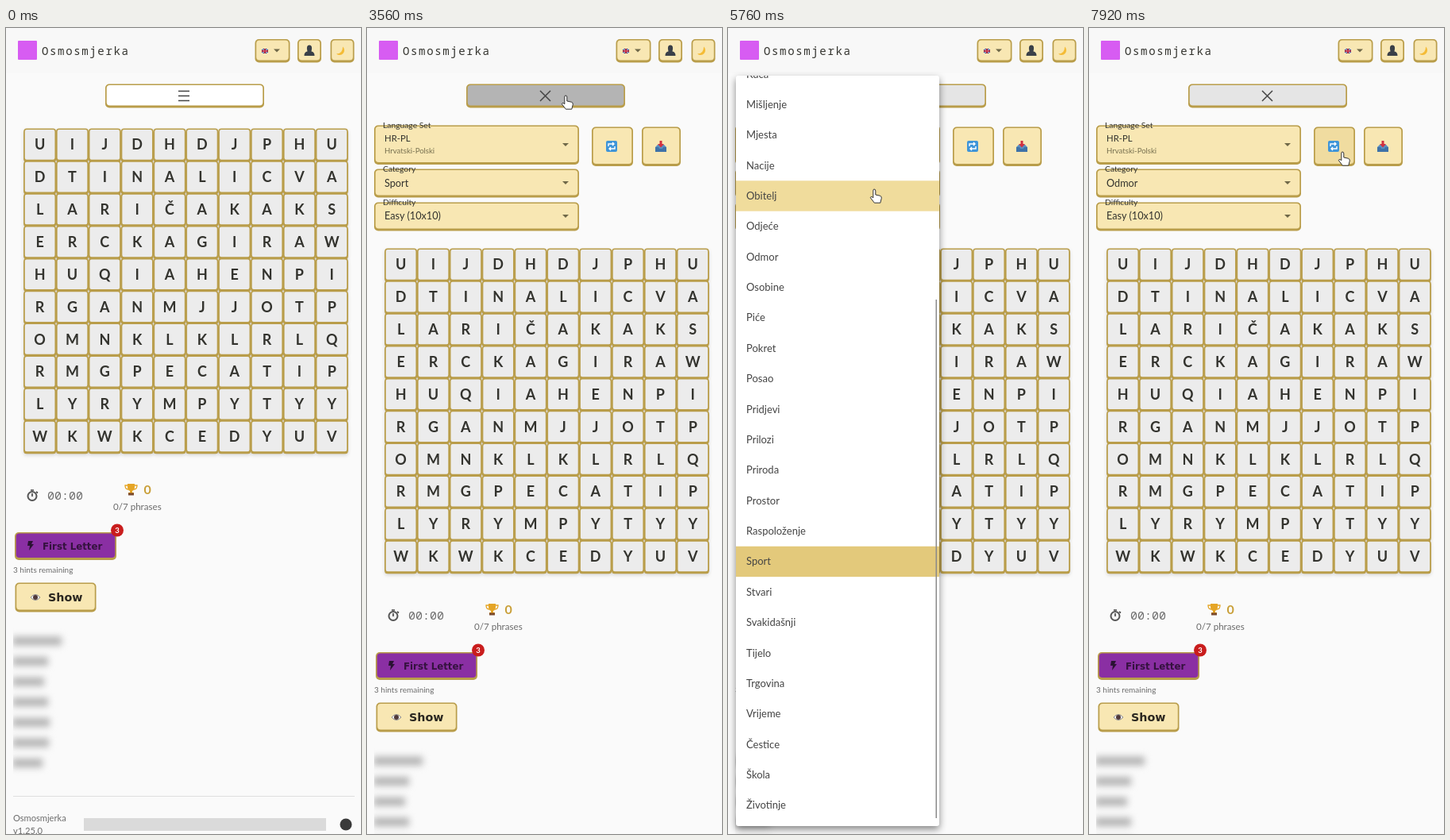
An HTML page that plays this animation: 447x1015 px, repeating every 8000 ms.

```html
<!DOCTYPE html>
<html lang="en">
<head>
<meta charset="utf-8">
<title>Word search</title>
<style>
  html, body { margin: 0; width: 100%; height: 100%; overflow: hidden; background: #fafafa; }
  svg { display: block; font-family: Lato, "Noto Sans", sans-serif; }
  .mono { font-family: "Noto Sans Mono", monospace; font-weight: 500; }
  .wide { font-family: "DejaVu Sans", sans-serif; font-weight: bold; }
  .cell { font-weight: 700; text-anchor: middle; }
  #grid { filter: drop-shadow(0 2px 2px #0002); }
  #menu > rect:first-child { filter: drop-shadow(0 4px 5px #0007); }
  #words { filter: blur(4.5px); }
</style>
</head>
<body>
<svg id="stage" width="447" height="1015" viewBox="0 0 447 1015"></svg>
<script>
const GOLD = '#b99d4a', CREAM = '#f8e7b3', INK = '#33332e', GREY = '#6c6c6c';
const ROW = 38.37, ROW0 = 58, SHIFT = 151;
const LETTERS = ['UIJDHDJPHU', 'DTINALICVA', 'LARIČAKAKS', 'ERCKAGIRAW', 'HUQIAHENPI',
  'RGANMJJOTP', 'OMNKLKLRLQ', 'RMGPECATIP', 'LYRYMPYTYY', 'WKWKCEDYUV'];
const CATEGORIES = ('Kuća Mišljenje Mjesta Nacije Obitelj Odjeće Odmor Osobine Piće Pokret Posao Pridjevi ' +
  'Prilozi Priroda Prostor Raspoloženje Sport Stvari Svakidašnji Tijelo Trgovina Vrijeme Čestice Škola Životinje').split(' ');

// Drawing helpers
const rect = (x, y, w, h, fill, more = '') =>
  `<rect x="${x}" y="${y}" width="${w}" height="${h}" fill="${fill}" ${more}/>`;
const text = (x, y, size, str, fill = INK, more = '') =>
  `<text x="${x}" y="${y}" font-size="${size}" fill="${fill}" ${more}>${str}</text>`;
const path = (d, fill, more = '') => `<path d="${d}" fill="${fill}" ${more}/>`;
const circle = (x, y, r, fill, more = '') => `<circle cx="${x}" cy="${y}" r="${r}" fill="${fill}" ${more}/>`;
const button = (x, y, w, h, fill = CREAM, id = '') =>
  rect(x, y, w, h, GOLD, 'rx="5"') +
  rect(x + 1.7, y + 1.5, w - 3.4, h - 4.5, fill, `rx="4" ${id && `id="${id}"`}`);
const caret = (x, y, id = '') => path(`M${x - 4} ${y - 2}h8l-4 4z`, '#6f6848', id && `id="${id}"`);
const field = (y, h, label, body) =>
  button(9, y, 258, h) + text(20, y + 3, 10.3, label) + body;

const header = rect(0, 0, 447, 57, '#f8f8f8') +
  rect(15, 16, 24, 24, '#d75cf2', 'rx="1"') +
  text(45, 33.5, 14, 'Osmosmjerka', INK, 'class="mono" letter-spacing="1.65"') +
  button(313.5, 14, 44, 29.5) + button(367, 14, 30, 29.5) + button(408.5, 14, 30, 29.5) +
  rect(322, 26, 8, 6, '#34477f') + path('M322 26l8 6m0-6l-8 6', 'none', 'stroke="#fff"') +
  path('M326 26v6m-4-3h8', 'none', 'stroke="#d02a40" stroke-width="1.6"') + caret(341, 28.5) +
  path('M375.5 35q0-5 4-5.5q-2-8 2.5-8t2.5 8q4 .5 4 5.5z', '#3a4048') +
  path('M424 23.5a6 6 0 1 1-8 9q8 0 8-9', '#f4bb35');

const menuButton = button(125, 70.5, 200, 30, '#fff', 'toggle') +
  path('', 'none', 'id="toggleIcon" stroke="#444" stroke-width="1.5"');

const panel = '<clipPath id="panelClip"><rect id="panelBox" y="112" width="447"/></clipPath>' +
  '<g id="panel" clip-path="url(#panelClip)">' +
  field(122.5, 49.5, 'Language Set', text(22, 142.5, 11.3, 'HR-PL') +
    text(22, 157.5, 9.6, 'Hrvatski-Polski', '#77704f') + caret(250, 147)) +
  field(177.5, 36, 'Category', text(22, 199.5, 12.7, 'Sport', INK, 'id="category"') + caret(250, 195, 'categoryCaret')) +
  field(219.5, 36, 'Difficulty', text(22, 241, 12.7, 'Easy (10x10)') + caret(250, 237)) +
  button(283, 124.5, 52, 49.5, CREAM, 'refresh') + button(346, 124.5, 49, 49.5) +
  rect(301, 142, 14, 14, '#3f95d8', 'rx="2"') +
  path('M304 149v-3h7m-2-2l2 2l-2 2m3 1v3h-7m2-2l-2 2l2 2', 'none', 'stroke="#fff" stroke-width="1.4"') +
  path('M363 150l3-3h8l3 3v6h-14z', '#5b8fc0') + path('M363 150h4l1 2h4l1-2h4v6h-14z', '#3f72a8') +
  path('M368.5 142h3v4h2.5l-4 4.5l-4-4.5h2.5z', '#d03040') + '</g>';

// Each cell has a thicker bottom edge; the next row covers it except at the end.
const pitch = 40.85;
const grid = LETTERS.map((line, r) => [...line].map((ch, c) => {
  const x = 22.2 + c * pitch, y = 126.4 + r * pitch, side = pitch - 1.6;
  return rect(x, y + 2, pitch, pitch - .6, GOLD, 'rx="3.5"') +
    rect(x + .8, y + .8, side, side, '#ececec', `rx="3" stroke="${GOLD}" stroke-width="1.6"`) +
    text(x + pitch / 2, y + 27, 18, ch, INK, 'class="cell"');
}).join('')).join('');

const stats =
  circle(33, 589.5, 5.5, '#f4f4f4', 'stroke="#555" stroke-width="2"') +
  path('M33 590v-4M31 582h4M38 584l2 1.5', 'none', 'stroke="#444" stroke-width="1.6"') +
  text(52, 594, 15, '00:00', GREY, 'class="mono"') +
  path('M153 574h9v4q0 4-3 5v2h2v3h-7v-3h2v-2q-3-1-3-5z', '#e5a526') +
  path('M153 576h-3q0 5 4 5m8-5h3q0 5-4 5', 'none', 'stroke="#e5a526" stroke-width="1.3"') +
  rect(154, 585.5, 7, 3, '#7b4a2c') +
  text(173.5, 587, 16, '0', '#c99f38', 'font-weight="700"') +
  text(135, 606.5, 11.6, '0/7 phrases', GREY) +
  button(11, 635, 128, 35, '#8a2fa3') +
  path('M28 646h6l-2 4h3l-6 8l1-6h-3z', '#2a1233') +
  text(46, 656.5, 11.8, 'First Letter', '#35123f', 'class="wide"') +
  circle(140, 632.5, 8, '#c91d1d') + text(137.3, 636, 9.5, '3', '#fff', 'font-weight="700"') +
  text(9, 685.5, 10, '3 hints remaining', GREY) +
  button(11.5, 698.5, 102, 37) +
  path('M31 717q6-7 12 0q-6 7-12 0', '#fff', 'stroke="#888"') + circle(37, 717, 3, '#513a3a') +
  text(53, 722, 14.3, 'Show', '#2b2720', 'class="wide"');

const words = [72, 55, 50, 55, 57, 56, 48].map((end, i) =>
  rect(8, 766.5 + i * 25.6, end - 10, 11, '#b4b4b4')).join('');
const wordsEdge = rect(0, 750, 9, 200, '#fafafa');

const footer = rect(9, 967, 430, 1, '#dfdfdf') +
  text(9, 999, 11.1, 'Osmosmjerka', GREY) + text(9, 1014.5, 11.2, 'v1.25.0', GREY) +
  rect(98, 995, 305, 16, '#dadada') + circle(428, 1003, 7.5, '#3a3a3a');

const menuRow = (i, fill, id) => rect(10, ROW0 + (i - .5) * ROW, 256, ROW, fill, `id="${id}"`);
const menu = '<clipPath id="menuClip"><rect x="10" y="60" width="256" height="945"/></clipPath><g id="menu">' +
  rect(10, 60, 256, 945, '#fff', 'rx="3"') + '<g clip-path="url(#menuClip)">' +
  menuRow(16, '#e3c97b', 'selected') + menuRow(3, '#f0dc9c', 'hover') +
  CATEGORIES.map((name, i) => text(23, ROW0 + i * ROW + 4.5, 13, name, '#444')).join('') +
  rect(261.5, 342, 1.5, 653, '#8a8a8a') + '</g></g>';

const cursor = '<g id="cursor" stroke="#333" stroke-linejoin="round">' +
  path('M0 0V13l3-3l2.5 5.5l2-1l-2.300-5h4z', '#fff', 'id="arrow"') +
  path('M0 0q1.8 0 1.8 2v5l5.5 1.2q2.2 .6 2 3l-1.5 6h-7.5l-5-6.5q.2-2 2.5-.8l1 1V2q0-2 1.2-2z', '#fff', 'id="hand"') + '</g>';

const stage = document.getElementById('stage');
stage.innerHTML = header + menuButton + panel +
  `<g id="lower"><g id="grid">${grid}</g>${stats}<g id="words">${words}</g>${wordsEdge}${footer}</g>` + menu + cursor;

const el = id => document.getElementById(id);
const set = (id, attrs) => { for (const k in attrs) el(id).setAttribute(k, attrs[k]); };

// Motion helpers
const clamp = v => Math.min(1, Math.max(0, v));
function ease(v) { // cubic-bezier(.4, 0, .2, 1)
  const x = clamp(v);
  let lo = 0, hi = 1;
  for (let i = 0; i < 18; i++) {
    const u = (lo + hi) / 2, k = 1 - u;
    if (1.2 * u * k * k + .6 * u * u * k + u ** 3 < x) lo = u; else hi = u;
  }
  return 3 * lo * lo * (1 - lo) + lo ** 3;
}
function track(keys, t) {
  const i = keys.findIndex(k => k[0] > t);
  if (i === 0) return keys[0].slice(1);
  if (i < 0) return keys.at(-1).slice(1);
  const a = keys[i - 1], b = keys[i], f = (t - a[0]) / (b[0] - a[0]);
  return a.slice(1).map((v, n) => v + (b[n + 1] - v) * f);
}

const BURSTS = [[0, 0], [1670, 2840], [3020, 3560], [4400, 5390], [5670, 5940], [6120, 6210], [6390, 7110], [7200, 7920]];
const POINTER = [[1670, 7, 64], [1850, 45, 67], [2120, 180, 79], [2300, 243, 84], [2390, 250, 85],
  [4310, 250, 85], [4490, 238, 112], [4670, 205, 182], [4760, 200, 191],
  [5580, 200, 191], [5670, 196, 194], [5760, 184, 203], [5850, 130, 244], [5940, 97, 267],
  [6030, 97, 267], [6210, 94, 282], [6750, 94, 282], [6930, 116, 266], [7110, 157, 235],
  [7290, 222, 204], [7470, 294, 168], [7650, 319, 156]];
const TOGGLE_GREY = [[2390, 255], [2660, 180], [4400, 180], [4670, 229]];
const OPEN = 4850, CLOSE = 6300, GROW = 432;

// Motion comes in bursts of 90 ms steps with still stretches between.
function stepTime(t) {
  const [start, end] = BURSTS.findLast(b => b[0] <= t);
  return Math.min(end, start + Math.floor((t - start) / 90) * 90);
}

function draw(now) {
  const t = stepTime(now % 8000);

  const open = ease((t - 2960) / 420);
  set('lower', { transform: `translate(0 ${SHIFT * open})` });
  set('panelBox', { height: (SHIFT + 5) * open });
  set('panel', { opacity: open });
  const [g] = track(TOGGLE_GREY, t);
  set('toggle', { fill: `rgb(${g},${g},${g})` });
  set('toggleIcon', { d: t < 3020 ? 'M217 79.5h14m-14 6h14m-14 6h14' : 'M218 79l13 13m0-13l-13 13' });

  const expanded = t >= OPEN && t < CLOSE;
  el('category').textContent = t < CLOSE ? 'Sport' : 'Odmor';
  set('categoryCaret', { transform: expanded ? 'rotate(180 250 195)' : '' });
  const closing = t >= CLOSE;
  const alpha = closing ? 1 - ease((t - CLOSE) / GROW) : ease((t - OPEN) / GROW);
  const grown = closing ? 1 - ease((t - CLOSE - GROW / 3) / (GROW * 2 / 3)) : ease((t - OPEN) / (GROW * 2 / 3));
  const s = .75 + .25 * grown;
  set('menu', {
    opacity: alpha, visibility: alpha > .001 ? 'visible' : 'hidden',
    transform: `translate(138 198) scale(${s} ${s * s}) translate(-138 -198)`
  });

  const [x, y] = track(POINTER, t);
  const row = Math.round((y - ROW0) / ROW);
  set('hover', { y: ROW0 + (row - .5) * ROW, opacity: t >= 5000 ? 1 : 0 });
  set('refresh', { fill: `color-mix(in srgb, #f0dca0 ${100 * clamp((t - 7470) / 270)}%, ${CREAM})` });

  const onToggle = x > 125 && x < 325 && y > 70 && y < 101;
  const onPanel = t > 3020 && y > 122 && (x < 267 || x > 283);
  const hand = onToggle || onPanel;
  set('cursor', { transform: `translate(${x} ${y})`, visibility: t < 1670 ? 'hidden' : 'inherit' });
  set('hand', { display: hand ? 'inline' : 'none' });
  set('arrow', { display: hand ? 'none' : 'inline' });
}

function loop() {
  draw(performance.now());
  requestAnimationFrame(loop);
}
loop();
</script>
</body>
</html>
```
